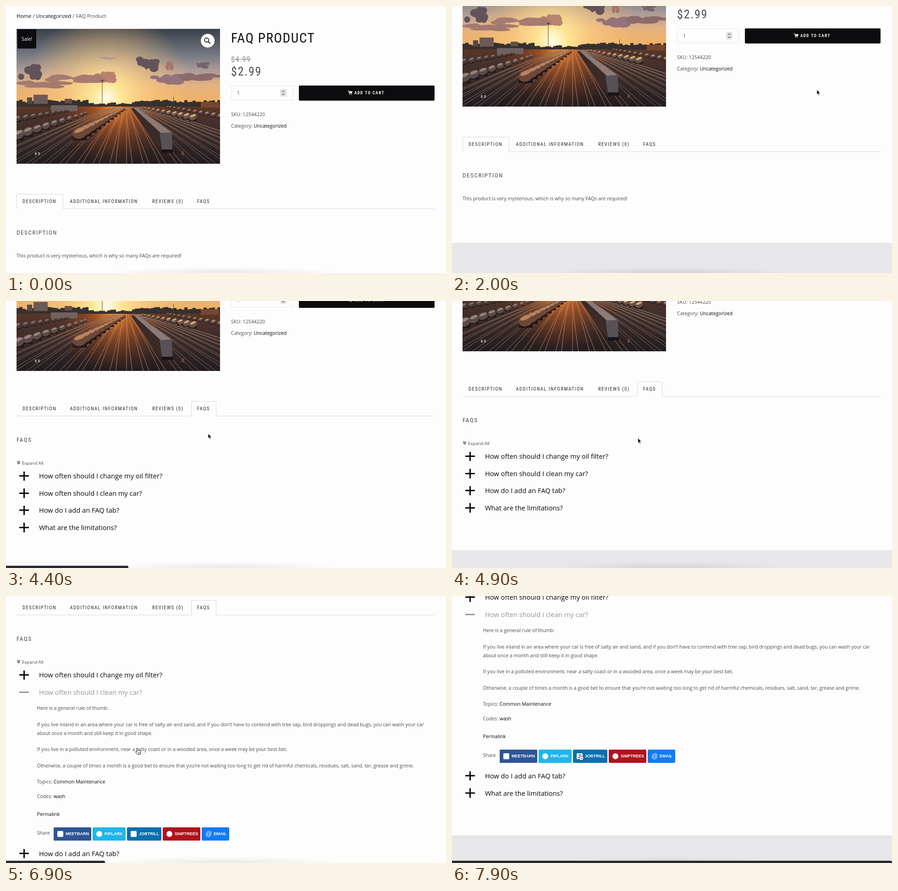
Write an HTML page with a canvas that moves like this. It is 960 px wide and 584 px high and loops after 8 s.

```html
<!DOCTYPE html>
<html lang="en">
<head>
<meta charset="utf-8">
<title>FAQ Product</title>
<style>
html, body { margin: 0; width: 100%; height: 100%; overflow: hidden; background: #fdfdfe; }
#stage { position: relative; width: 960px; height: 584px; overflow: hidden; font-family: "Open Sans", sans-serif; color: #4b4b50; }
#stage div, #stage canvas, #stage svg { position: absolute; }
.t { line-height: 0; white-space: pre; }
.t b { font-weight: 400; color: #08080a; }
.rc { font-family: "Roboto Condensed", Roboto, sans-serif; font-stretch: 75%; }
.sh { font-family: "Liberation Sans", Arial, sans-serif; font-weight: 700; color: #fff; }
.tab { box-sizing: border-box; top: 411px; height: 33px; border: 1px solid #d9d9e2; border-bottom: 0; border-radius: 3px 3px 0 0; background: #fdfdfe; }
.foot { left: 0; width: 960px; height: 400px; background: #e7e7ea; }
#answer { left: 0; top: 630px; width: 960px; overflow: hidden; }
#glow { left: 220px; top: 570px; width: 510px; height: 28px; background: radial-gradient(closest-side, rgba(40,40,40,.1), rgba(40,40,40,0)); }
#status { left: 0; top: 579px; height: 8px; background: #2a2a32; border-radius: 0 3px 0 0; }
#cursor { left: 0; top: 0; overflow: visible; }
</style>
</head>
<body>
<div id="stage">
  <div id="page"></div>
  <div id="glow"></div>
  <div id="status"></div>
  <svg id="cursor" width="1" height="1">
    <path id="arrow" d="M0 0V10.8L2.4 8.6 4 12.4 5.9 11.6 4.3 7.9H7.6Z" fill="#08080c" stroke="#fff" stroke-width=".8"/>
    <g id="hand" stroke="#111" stroke-width="1" stroke-linejoin="round">
      <path d="M-1.3 1.2C-1.5-.5 1-.6 1.3 1L2.2 5C3 4.2 4.2 4.5 4.5 5.2 5.3 4.6 6.3 5 6.5 5.8 7.3 5.4 8.2 6 8.2 7L8 10 7 13.6H.8L-3.4 8.6C-4.2 7-2.6 6.4-1.6 7.4L-.2 8.4Z" fill="#fff"/>
      <path d="M2.4 8.4V11.4M4.2 8.4V11.4M6 8.4V11.4" stroke-width=".7"/>
    </g>
  </svg>
</div>
<script>
const $ = id => document.getElementById(id);
const page = $('page');

function box(parent, x, y, w, h, style = '', cls = '') {
  const el = document.createElement('div');
  el.className = cls;
  el.style.cssText = `left:${x}px;top:${y}px;width:${w}px;height:${h}px;${style}`;
  parent.append(el);
  return el;
}
function group(parent, id = '') {
  const el = box(parent, 0, 0, 0, 0);
  el.id = id;
  return el;
}
// y is the middle of the capitals
function text(parent, html, x, y, size, style = '', cls = '') {
  const el = document.createElement('div');
  el.className = 't ' + cls;
  el.style.cssText = `left:${x}px;top:${y}px;font-size:${size}px;${style}`;
  el.innerHTML = html;
  parent.append(el);
  return el;
}
const caps = (parent, str, x, y, size, gap, style = '') =>
  text(parent, str, x, y, size, `letter-spacing:${gap}px;${style}`, 'rc');
function icon(parent, x, y, d, style) {
  const s = document.createElementNS('http://www.w3.org/2000/svg', 'svg');
  s.style.cssText = `left:${x}px;top:${y}px;overflow:visible;fill:none;${style}`;
  s.setAttribute('width', 16);
  s.setAttribute('height', 16);
  s.innerHTML = `<path d="${d}"/>`;
  parent.append(s);
}

// ---- sunset photo
function photo() {
  const c = document.createElement('canvas');
  c.width = 444; c.height = 295;
  c.style.cssText = 'left:23px;top:50px';
  page.append(c);
  const g = c.getContext('2d');
  const shade = (grad, stops) => {
    stops.forEach(([p, col]) => grad.addColorStop(p, col));
    return grad;
  };
  const rect = (x, y, w, h, f) => { g.fillStyle = f; g.fillRect(x, y, w, h); };
  const poly = (f, ...p) => {
    g.fillStyle = f;
    g.beginPath();
    for (let i = 0; i < p.length; i += 2) g.lineTo(p[i], p[i + 1]);
    g.fill();
  };
  let seed = 7;
  const rnd = () => (seed = seed * 16807 % 2147483647) / 2147483647;

  rect(0, 0, 444, 170, shade(g.createLinearGradient(0, 0, 0, 170), [
    [0, '#3b414b'], [.3, '#6d727d'], [.52, '#a79a98'], [.72, '#e2b183'], [1, '#f6b25a']]));
  rect(0, 0, 444, 170, shade(g.createRadialGradient(197, 152, 4, 197, 152, 190), [
    [0, '#fffbe0'], [.16, 'rgba(255,232,150,.95)'], [.5, 'rgba(255,205,130,.55)'], [1, 'rgba(255,190,110,0)']]));

  const cloud = (x, y, w, h, col) => {
    g.fillStyle = col;
    for (let i = 0; i < 14; i++) {
      g.beginPath();
      g.ellipse(x + (rnd() - .5) * w * .8, y + (rnd() - .5) * h * .6, w * (.1 + rnd() * .12), h * (.15 + rnd() * .15), 0, 0, 7);
      g.fill();
    }
  };
  cloud(30, 95, 50, 38, '#62525a');
  cloud(285, 77, 48, 34, '#665259');
  cloud(334, 80, 16, 20, '#a97268');
  cloud(405, 80, 30, 14, '#75646a');
  cloud(195, 64, 40, 6, '#b79a92');
  cloud(195, 107, 46, 26, '#b98370');
  cloud(125, 110, 130, 20, '#a67b70');
  cloud(60, 122, 110, 16, '#a37a6e');
  cloud(330, 110, 80, 26, '#96737a');
  cloud(400, 106, 90, 20, '#8b6c6d');

  rect(0, 165, 444, 130, shade(g.createLinearGradient(0, 165, 0, 295), [
    [0, '#5d3826'], [.3, '#45302b'], [1, '#211c20']]));
  rect(0, 165, 444, 130, shade(g.createRadialGradient(215, 165, 4, 215, 170, 130), [
    [0, 'rgba(255,150,50,.95)'], [.35, 'rgba(200,95,35,.6)'], [1, 'rgba(110,50,30,0)']]));

  // skyline
  for (let x = 0; x < 444; x += 6) {
    const h = 6 + rnd() * 6 - (Math.abs(x - 200) < 50 ? 5 : 0);
    rect(x, 167 - h, 7, h + 3, '#36302e');
  }
  rect(37, 144, 31, 20, '#6b5a55');
  rect(23, 150, 11, 14, '#564843');
  rect(105, 153, 16, 10, '#67504a');
  rect(75, 167, 58, 13, '#6f6260');
  rect(402, 160, 40, 12, '#76472f');
  rect(186.5, 112, 1, 50, '#59402f');
  rect(184, 112, 6, 2, '#4d3b32');
  rect(342, 148, 1, 20, '#5c4130');

  // rails
  for (let i = -9; i <= 11; i++) {
    g.strokeStyle = i > -5 && i < 4 ? '#c08a60' : '#8a7567';
    g.lineWidth = .9;
    for (const d of [0, 13]) {
      const end = 240 + i * 37 + d;
      g.beginPath();
      g.moveTo(240 + i * 3, 172);
      g.quadraticCurveTo(240 + i * 15, 205, end, 297);
      g.stroke();
    }
  }

  // tank wagons in a row, growing towards the viewer
  const tanks = (x0, y0, x1, y1, r0, r1, n, col, top) => {
    for (let i = 0; i < n; i++) {
      const k = (i / (n - 1)) ** 1.3, r = r0 + (r1 - r0) * k;
      const x = x0 + (x1 - x0) * k, y = y0 + (y1 - y0) * k;
      rect(x - r * 1.2, y + r * .5, r * 2.4, r * .8, '#1f191b');
      g.fillStyle = col;
      g.beginPath(); g.ellipse(x, y, r * 1.3, r, -.4, 0, 7); g.fill();
      g.fillStyle = top;
      g.beginPath(); g.ellipse(x, y - r * .45, r, r * .35, -.4, 0, 7); g.fill();
    }
  };
  tanks(150, 184, 4, 231, 3, 10, 10, '#5b4a48', '#98847a');
  tanks(110, 178, 2, 196, 3, 6, 9, '#4a3d3d', '#8a7267');
  tanks(234, 175, 138, 227, 3, 13, 11, '#6d4737', '#b9845f');
  tanks(275, 172, 385, 193, 2, 7, 11, '#6a5145', '#d0aa7e');
  tanks(330, 170, 444, 190, 2, 5, 11, '#554541', '#b99474');

  poly('#3a2a28', 250, 174, 262, 174, 345, 238, 318, 268, 283, 222);
  poly('#8b7b78', 256, 174, 264, 173, 339, 227, 315, 228);
  poly('#575156', 312, 228, 339, 226, 340, 263, 318, 268);
  rect(317, 264, 24, 7, '#171418');
  rect(40, 270, 4, 6, '#8f8786');
  rect(47, 270, 4, 6, '#8f8786');
  rect(360, 268, 5, 8, '#764335');
}
photo();

// ---- product head
text(page, '<b>Home</b> / <b>Uncategorized</b> / FAQ Product', 23, 22, 11.41);
box(page, 25, 51, 41, 42, 'background:#0d0d10');
text(page, 'Sale!', 34, 72, 10.6, 'color:#fff');
box(page, 425, 61, 30, 30, 'background:#fff;border-radius:50%');
icon(page, 432, 69, 'M10.3 5.5A4.6 4.6 0 1 1 1.1 5.5 4.6 4.6 0 1 1 10.3 5.5M9 9L14 13.4', 'stroke:#111;stroke-width:1.7');
caps(page, 'FAQ PRODUCT', 491, 70, 29.3, 1.5, 'color:#111114');
caps(page, '$4.99', 491, 116.5, 16.3, 1.4, 'color:#8d8d92;text-decoration:line-through');
caps(page, '$2.99', 491, 142.5, 26, 1.8);
box(page, 491, 174, 134, 30, 'border:1px solid #e9e9ee');
text(page, '1', 504, 190, 10.6);
box(page, 598, 182, 14, 16, 'background:#e1e1e6;border-radius:3px');
icon(page, 598, 182, 'M4.5 6L7 3.5 9.5 6M4.5 10L7 12.5 9.5 10', 'stroke:#55555c;stroke-width:1.1');
const cart = box(page, 638.5, 174, 296.5, 32.5, 'border-radius:2px');
icon(page, 746, 185, 'M0 .8H2L3 6H8.2M2.3 2H9.3L8.4 5H3Z', 'stroke:#fff;stroke-width:1.1;fill:#fff');
icon(page, 746, 185, 'M3 8.2H4.6M7 8.2H8.6', 'stroke:#fff;stroke-width:1.6');
caps(page, 'ADD TO CART', 760, 190, 9, 1.45, 'color:#fff;font-weight:700');
text(page, 'SKU: 12544220', 491, 237, 10.6);
text(page, 'Category: <b>Uncategorized</b>', 491, 262, 10.6);

// ---- tabs
box(page, 23, 443, 912, 1, 'background:#d9d9e2');
const tabBox = box(page, 23, 411, 102, 33, '', 'tab');
[['DESCRIPTION', 36], ['ADDITIONAL INFORMATION', 139.5], ['REVIEWS (0)', 319], ['FAQS', 417]]
  .forEach(([s, x]) => caps(page, s, x, 427.5, 10.6, 1.45, 'color:#2c2c31'));

const desc = group(page);
caps(desc, 'DESCRIPTION', 23, 496, 13, 1.6);
text(desc, 'This product is very mysterious, which is why so many FAQs are required!', 23, 546, 10.6);
box(desc, 0, 643, 960, 400, '', 'foot');

// ---- questions
const faqs = group(page);
caps(faqs, 'FAQS', 23, 496, 13, 1.6);
icon(faqs, 24, 541, 'M.5 1L3.5 4 6.5 1M.5 4.5L3.5 7.5 6.5 4.5', 'stroke:#444;stroke-width:1.5');
text(faqs, 'Expand All', 35, 546.5, 9.6);
const lower = group(faqs);
function question(parent, str, y) {
  const q = group(parent);
  q.style.color = '#08080a';
  box(q, 29, y - 1, 20.5, 3.4, 'background:currentColor');
  q.bar = box(q, 37.5, y - 9.5, 3.4, 20.5, 'background:currentColor');
  text(q, str, 72, y, 14.67);
  return q;
}
question(faqs, 'How often should I change my oil filter?', 574);
const picked = question(faqs, 'How often should I clean my car?', 611.5);
question(lower, 'How do I add an FAQ tab?', 649);
question(lower, 'What are the limitations?', 686.5);
box(lower, 0, 779.5, 960, 400, '', 'foot');

const answer = group(faqs, 'answer');
answer.style.cssText = '';
[['Here is a general rule of thumb:', 647],
 ['If you live inland in an area where your car is free of salty air and sand, and if you don’t have to contend with tree sap, bird droppings and dead bugs, you can wash your car', 682.5],
 ['about once a month and still keep it in good shape.', 701.5],
 ['If you live in a polluted environment, near a salty coast or in a wooded area, once a week may be your best bet.', 737],
 ['Otherwise, a couple of times a month is a good bet to ensure that you’re not waiting too long to get rid of harmful chemicals, residues, salt, sand, tar, grease and grime.', 772.5],
 ['Topics: <b>Common Maintenance</b>', 808],
 ['Codes: <b>wash</b>', 840],
 ['<b>Permalink</b>', 879],
 ['Share', 920]
].forEach(([s, y]) => text(answer, s, 67.5, y - 630, 10.6));
[['MEETBARN', 104, 82, '#2f5597', 2], ['PIPLARK', 189, 72, '#1fb6ee', 7], ['JOBTRILL', 264, 75, '#0a70ae', 2],
 ['SNIPTREES', 342, 82, '#b3121d', 7], ['EMAIL', 427, 60, '#0f7cf6']
].forEach(([s, x, w, col, r]) => {
  const b = box(answer, x, 277.5, w, 29, `background:${col};border-radius:2px`);
  if (r) box(b, 8, 8, 13, 13, `background:#fff;border-radius:${r}px`);
  else text(b, '@', 8, 14, 14, 'font-weight:400', 'sh');
  text(b, s, 26, 14.5, 9, '', 'sh');
});

// ---- timing
const clamp = v => Math.max(0, Math.min(1, v));
const ramp = (t, a, b) => clamp((t - a) / (b - a));
const ease = k => k * k * (3 - 2 * k);
function track(keys, t, i, f = k => k) {
  let n = 1;
  while (n < keys.length - 1 && t > keys[n][0]) n++;
  const a = keys[n - 1], b = keys[n];
  return a[i] + (b[i] - a[i]) * f(ramp(t, a[0], b[0]));
}
const scroll = [[1000, 0], [1200, 28], [1500, 75], [2000, 125], [2400, 175], [2700, 192],
  [4600, 192], [5200, 277], [6350, 277], [6600, 315], [7100, 460], [7300, 503], [7650, 571.5]];
const mouse = [[100, 720, 590], [800, 796, 183], [2800, 796, 183], [3550, 431, 236], [4000, 431, 236],
  [4400, 441, 290], [4700, 441, 290], [5350, 286, 333], [7450, 286, 333], [7850, 279, 346]];
const within = (t, ...spans) => spans.some(([a, b]) => t >= a && t < b);
const show = (el, on) => el.style.display = on ? '' : 'none';

function draw(t) {
  const faqOpen = t >= 3850, open = ease(ramp(t, 5600, 5950));
  page.style.transform = `translateY(${-Math.round(track(scroll, t, 1))}px)`;

  const lit = ramp(t, 650, 850) - ramp(t, 1350, 1550);
  cart.style.background = `rgb(${[12, 12, 14].map(v => v + 30 * lit)})`;

  show(desc, !faqOpen);
  show(faqs, faqOpen);
  tabBox.style.left = faqOpen ? '404px' : '23px';
  tabBox.style.width = faqOpen ? '55px' : '102px';
  answer.style.height = open * 315.5 + 'px';
  lower.style.transform = `translateY(${open * 315.5}px)`;
  picked.style.color = t >= 5300 ? '#96969b' : '#08080a';
  show(picked.bar, t < 5600);

  const w = within(t, [3500, 4550]) ? 267 : within(t, [5400, 7750]) ? 216 : t >= 7750 ? 960 : 0;
  $('status').style.width = w + 'px';

  const hand = within(t, [700, 1350], [3480, 4120], [5280, 8000]);
  show($('hand'), hand);
  show($('arrow'), !hand);
  show($('cursor'), t >= 100);
  $('cursor').style.transform = `translate(${track(mouse, t, 1, ease)}px,${track(mouse, t, 2, ease)}px)`;
}
const start = performance.now();
function tick() {
  draw((performance.now() - start) % 8000);
  requestAnimationFrame(tick);
}
tick();
</script>
</body>
</html>
```
